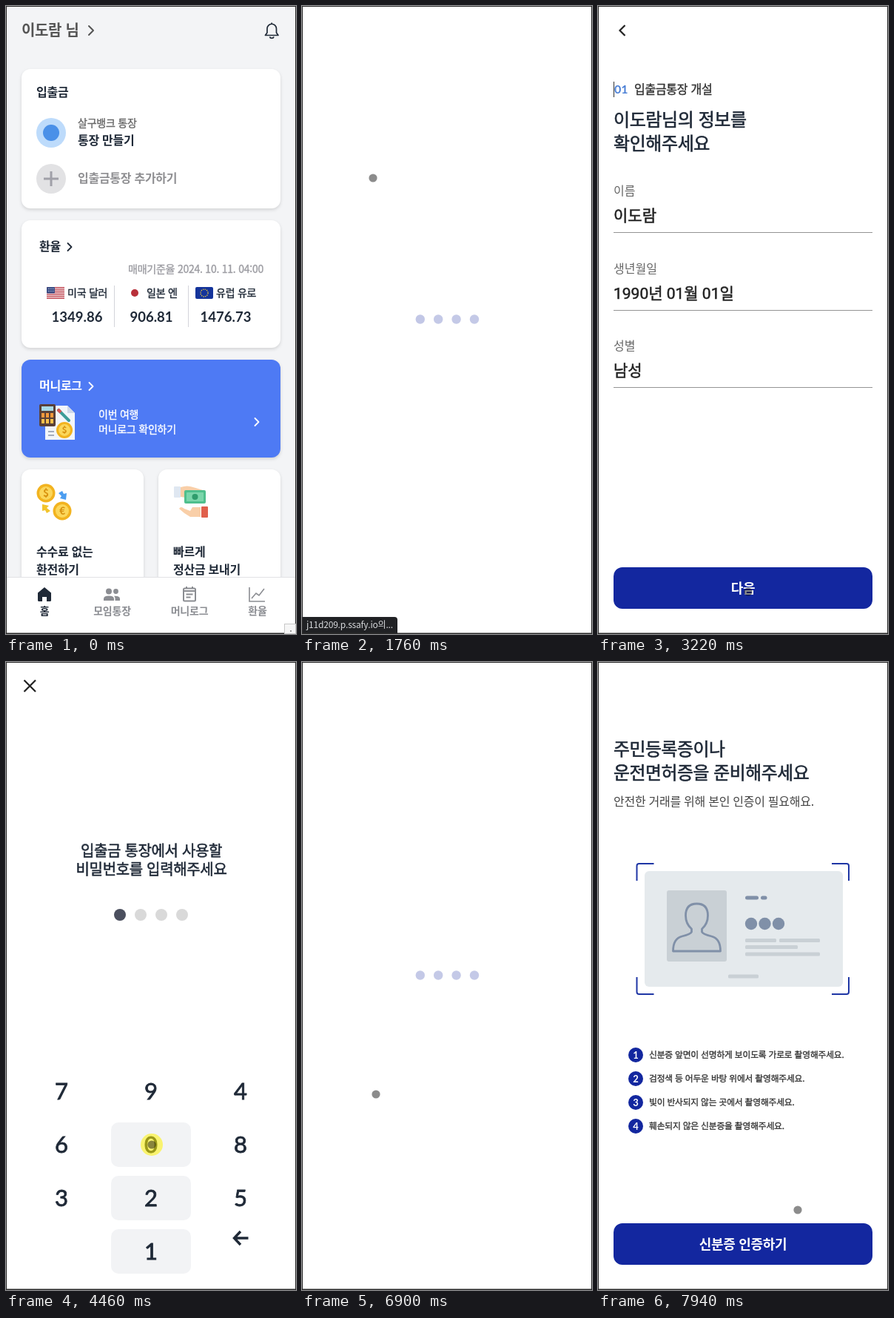
An HTML page for the animation above (8000 ms loop, 392x847 px).

```html
<!DOCTYPE html>
<html lang="ko">
<head>
<meta charset="utf-8">
<style>
html, body { margin: 0; width: 100%; height: 100%; overflow: hidden; background: #fff; }
svg { display: block; width: 100vw; height: 100vh; }
text { font-family: "Noto Sans CJK KR", "Noto Sans", sans-serif; letter-spacing: -.017em; }
.num { font-family: Lato, "Noto Sans CJK KR", sans-serif; letter-spacing: 0; }
.field { font-family: Roboto, "Noto Sans CJK KR", sans-serif; letter-spacing: 0; }
.card { filter: drop-shadow(0 2px 2px #0002); }
</style>
</head>
<body>
<svg id="stage" viewBox="0 0 392 847"></svg>
<script>
const LOOP = 8000, INK = '#1f2937', NAVY = '#13279f', GREY = '#8b8d92';

// --- drawing helpers -------------------------------------------------
const rect = (x, y, w, h, fill, rx = 0, extra = '') =>
  `<rect x="${x}" y="${y}" width="${w}" height="${h}" rx="${rx}" fill="${fill}" ${extra}/>`;
const circle = (x, y, r, fill, extra = '') =>
  `<circle cx="${x}" cy="${y}" r="${r}" fill="${fill}" ${extra}/>`;
const line = (d, stroke, width, extra = '') =>
  `<path d="${d}" fill="none" stroke="${stroke}" stroke-width="${width}" ${extra}/>`;
const shape = (d, fill) => `<path d="${d}" fill="${fill}"/>`;

// y is the vertical middle of the glyphs; weight 500 is regular thickened by a thin stroke
function text(x, y, size, str, fill = INK, weight = 700, anchor = 'start', kind = '') {
  const medium = weight === 500 ? `stroke="${fill}" stroke-width="${size * .026}"` : '';
  return `<text x="${x}" y="${y + size * .37}" font-size="${size}" font-weight="${medium ? 400 : weight}"
    fill="${fill}" text-anchor="${anchor}" class="${kind}" ${medium}>${str}</text>`;
}
const chevron = (x, y, color, s = 5, width = 1.8) =>
  line(`M${x - s / 2} ${y - s}l${s} ${s}l${-s} ${s}`, color, width, 'stroke-linecap="round" stroke-linejoin="round"');
const card = (x, y, w, h, fill = '#fff') => rect(x, y, w, h, fill, 12, 'class="card"');
const coin = (x, y, r, sign) => circle(x, y, r, '#f2b31f') + circle(x, y, r * .72, '#fbd75b') +
  text(x, y, r * 1.1, sign, '#d8920f', 700, 'middle');
const button = label => rect(21, 757, 350, 56, NAVY, 12) + text(196, 785, 18, label, '#fff', 700, 'middle');

// --- home ------------------------------------------------------------
function flags() {
  let stripes = '';
  for (let i = 0; i < 7; i++) stripes += rect(55, 379 + i * 2.46, 24, 1.24, '#c0404c');
  return rect(55, 379, 24, 16, '#f3e9ea', 2) + stripes + rect(55, 379, 11, 8.5, '#3c4f86', 1) +
    line('M57 381.5h8M57 384.5h8', '#c9d0e6', 1, 'stroke-dasharray="1 1.2"') +
    circle(174, 387, 5, '#b8303a') +
    rect(256, 379, 24, 16, '#14349b', 2) +
    circle(268, 387, 5, 'none', 'stroke="#f2cf3b" stroke-width="1.3" stroke-dasharray="1.3 1.32"');
}

function homeIcons() {
  const ledger = shape('M53 539h30l10 10v36h-40z', '#f2f5fa') + shape('M83 539v10h10z', '#cfd8e8') +
    rect(45, 537, 22, 30, '#5a4038', 2) + rect(48, 540, 16, 6, '#a9dbe6') +
    [0, 1, 2].map(i => rect(48 + i * 6, 549, 4, 6, '#f59a3c') + rect(48 + i * 6, 557, 4, 6, '#f8c04c')).join('') +
    line('M71 545l14 14', '#3d9c98', 4, 'stroke-linecap="round"') + line('M70 544l4 4', '#d95353', 4) +
    line('M57 574h8M57 579h8', '#8a94a8', 1.6) + coin(79, 572, 11, '$');
  const exchange = coin(54, 657, 12.5, '$') + coin(76, 681, 12.5, '€') +
    shape('M71 657l5-3 2 4 4-1-1 9-8-2 2-3z', '#4c9df0') + shape('M60 681l-5 3-2-4-4 1 0-9 9 2-3 3z', '#f2c32b');
  const hands = rect(227, 648, 9, 15, '#dfe7f1', 1) + shape('M236 649q9-3 17 0l13 4v5h-20l-3 5-7-1z', '#f9cfa8') +
    rect(241, 653, 29, 18, '#4fbf8d', 2) + rect(244, 656, 23, 12, '#7bd6ab', 1) + circle(255.5, 662, 4, '#2f9c6c') +
    shape('M263 676v13h-14q-9-5-15-11q2-4 7 0l8 3 3-5z', '#f9cfa8') + rect(264, 675, 9, 15, '#e0604c', 1);
  return ledger + exchange + hands;
}

function nav() {
  const label = (x, str, color) => text(x, 816, 14, str, color, 700, 'middle');
  const list = rect(240, 785.5, 16, 17, 'none', 1.5, `stroke="${GREY}" stroke-width="2"`) +
    line('M240 789h16M243.5 793.5h9M243.5 797.5h6M244 783v3M252 783v3', GREY, 2);
  const people = circle(139, 789.5, 4, GREY) + circle(148.5, 789.5, 3.4, GREY) +
    shape('M132 802v-2.5q0-4 7-4t7 4v2.5z', GREY) + shape('M147.5 802v-3q0-2-1.5-3.2q8-.5 8 3.7v2.5z', GREY);
  return rect(0, 770, 392, 77, '#fff') + rect(0, 770, 392, 1, '#e1e2e5') +
    shape('M52 784l9 7.5v10q0 1.5-1.5 1.5h-4.5v-6h-6v6h-4.5q-1.5 0-1.5-1.5v-10z', INK) +
    people + list + line('M329 784v19h21M332 799l6-7 4 3 7-9', GREY, 1.6) +
    label(52, '홈', INK) + label(143.5, '모임통장', GREY) + label(248, '머니로그', GREY) + label(340, '환율', GREY);
}

function home() {
  const rate = (x, str) => text(x, 419, 18.5, str, INK, 700, 'middle', 'num');
  return rect(0, 0, 392, 847, '#f3f4f6') +
    text(21, 33, 20, '이도람 님', '#555') + chevron(115, 33, '#555', 6, 2) +
    line('M350.5 39.5h17.5l-2.5-3.5v-5.5a6.2 6.2 0 0 0-12.5 0v5.5zM356.5 41.5a2.8 2.3 0 0 0 5.5 0M359.2 22.5v2', INK, 1.7, 'stroke-linejoin="round"') +
    card(21, 85, 350, 188) + text(41, 116, 16, '입출금') +
    circle(61, 171, 20, '#bddbfb') + circle(61, 171, 11, '#4a90e8') +
    text(97, 158, 14, '살구뱅크 통장', '#666', 500) + text(97, 181, 16, '통장 만들기') +
    circle(61, 233, 20, '#e2e2e4') + line('M51 233h20M61 223v20', '#a0a0a8', 3) +
    text(97, 232, 16, '입출금통장 추가하기', '#8f8f92') +
    card(21, 289, 350, 172) + text(45, 324, 16, '환율') + chevron(86, 325, INK) +
    text(348, 355, 14, '매매기준율 2024. 10. 11. 04:00', '#9c9ca2', 500, 'end') + flags() +
    text(83, 387, 14, '미국 달러', INK, 500) + text(190, 387, 14, '일본 엔', INK, 500) + text(284, 387, 14, '유럽 유로', INK, 500) +
    rate(96, '1349.86') + rate(196.5, '906.81') + rate(297, '1476.73') +
    rect(146, 377, 1, 56, '#d3d4da') + rect(246, 377, 1, 56, '#d3d4da') +
    card(21, 477, 350, 132, '#4e7af4') + text(45, 512, 16, '머니로그', '#fff') + chevron(115, 513, '#fff') +
    text(125, 551, 14, '이번 여행', '#fff', 500) + text(125, 571, 14, '머니로그 확인하기', '#fff', 500) + chevron(339, 561, '#fff') +
    card(21, 625, 165, 190) + card(206, 625, 165, 190) + homeIcons() +
    text(41, 736, 16, '수수료 없는') + text(41, 760, 16, '환전하기') +
    text(226, 736, 16, '빠르게') + text(226, 760, 16, '정산금 보내기') + nav();
}

// --- other screens ---------------------------------------------------
const loader = () => [0, 1, 2, 3].map(i => circle(159.8 + i * 24.4, 422.5, 6.2, NAVY, 'class="pulse"')).join('');

function form() {
  const row = (y, label, value) => text(21, y, 16, label, '#666', 400, 'start', 'field') +
    text(21, y + 33, 21, value, '#222', 500, 'start', 'field') + rect(21, y + 56, 350, 1, '#949494');
  return line('M36.5 26l-7 7 7 7', '#222', 2.2) +
    text(22, 112, 16, '01', '#4a7fd5', 700, 'start', 'num') + text(49, 112, 16, '입출금통장 개설', '#333', 500) +
    `<g id="caret">${rect(21, 102, 1, 21, '#333')}</g>` +
    text(21, 153, 24, '이도람님의 정보를', INK, 500) + text(21, 185, 24, '확인해주세요', INK, 500) +
    row(249, '이름', '이도람') + row(354, '생년월일', '1990년 01월 01일') + row(458, '성별', '남성') + button('다음');
}

const keyX = i => 75 + (i < 9 ? i % 3 : 1) * 121;
const keyY = i => 579 + Math.floor(i / 3) * 72;

function keypad(lines, digits) {
  const keys = [...digits].map((d, i) =>
    rect(keyX(i) - 54, keyY(i) - 30, 108, 60, '#f2f3f5', 10, 'class="key"') +
    text(keyX(i), keyY(i), 31, d, INK, 500, 'middle', 'num')).join('');
  return line('M24.5 24.5l15.5 15.5M40 24.5l-15.5 15.5', '#222', 2.2) +
    lines.map((s, i) => text(196.5, 255 + i * 25, 20, s, INK, 500, 'middle')).join('') +
    [0, 1, 2, 3].map(i => circle(154 + i * 28, 341, 8, '#d9d9d9', 'class="pin"')).join('') + keys +
    line('M317 768l-8.5 9 8.5 9M309 777h18.5', INK, 3.4);
}

function identity() {
  const slate = '#8090a8', pale = '#c9d0d5';
  const tips = ['신분증 앞면이 선명하게 보이도록 가로로 촬영해주세요.', '검정색 등 어두운 바탕 위에서 촬영해주세요.',
    '빛이 반사되지 않는 곳에서 촬영해주세요.', '훼손되지 않은 신분증을 촬영해주세요.'];
  const tip = (str, i) => circle(51, 530 + i * 32, 10, NAVY) +
    text(51, 530 + i * 32, 13, i + 1, '#fff', 700, 'middle', 'num') + text(69, 530 + i * 32, 11.8, str, '#333', 500);
  return text(21, 117, 23.8, '주민등록증이나', INK, 500) + text(21, 149, 23.8, '운전면허증을 준비해주세요', INK, 500) +
    text(21, 188, 16, '안전한 거래를 위해 본인 인증이 필요해요.', '#444', 400) +
    line('M52.5 295v-20q0-3 3-3h20M316 272h20q3 0 3 3v20M339 425v20q0 3-3 3h-20M75.5 448h-20q-3 0-3-3v-20', '#1f36a5', 2) +
    rect(63, 282, 268, 156, '#e5eaed', 6) + rect(93, 308, 81, 96, pale, 3) +
    line('M101.5 390q0-17 12-20q12-3 13-6v-4q-8-7-8-18q0-16 15-16t15 16q0 11-8 18v4q1 3 13 6q12 3 12 20z', slate, 2.8, 'stroke-linejoin="round"') +
    rect(199, 315.5, 18, 5, slate, 2.5) + rect(220, 315.5, 8.5, 5, slate, 2.5) +
    [207, 225.5, 244].map(x => circle(x, 353, 8.2, slate)).join('') +
    [[199, 373, 42], [245, 373, 55], [199, 382, 71], [199, 391.5, 101], [176, 421.5, 41]]
      .map(([x, y, w]) => rect(x, y, w, 5, pale, 1.5)).join('') +
    tips.map(tip).join('') + button('신분증 인증하기');
}

const screens = {
  home: home(), loader: loader(), form: form(),
  pin: keypad(['입출금 통장에서 사용할', '비밀번호를 입력해주세요'], '7946083251'),
  again: keypad(['비밀번호를', '한 번 더 입력해주세요'], '0458169732'),
  identity: identity()
};

const stage = document.getElementById('stage');
stage.innerHTML = rect(0, 0, 392, 847, '#fff') +
  Object.entries(screens).map(([id, body]) => `<g id="${id}">${body}</g>`).join('') +
  `<g id="status">${shape('M0 824h125q4 0 4 4v18h-129z', '#202124')}${text(6, 834.5, 12, 'j11d209.p.ssafy.io의...', '#d8dadd', 400)}</g>` +
  `<g id="pointer">${circle(0, 0, 15, '#fff200', 'id="halo" opacity=".55"')}${circle(0, 0, 5.6, '#000', 'opacity=".45"')}</g>` +
  line('M0 .5h392M.5 0v847M391.5 0v847', '#2b2b2b', 1) + rect(0, 845.5, 392, 1.5, '#2b2b2b') +
  `<g id="grip">${rect(376.5, 833.5, 15, 13, '#f6f6f6', 0, 'stroke="#c8c8c8"')}${rect(384, 842, 2, 2, '#999')}</g>`;

// --- timeline --------------------------------------------------------
const scenes = [[0, 'home'], [1730, 'loader'], [2150, 'form'], [3400, 'loader'], [3720, 'pin'],
  [5130, 'again'], [6890, 'loader'], [7330, 'identity']];
const path = [[410, 400, 375], [480, 372, 364], [620, 305, 288], [770, 230, 226], [900, 180, 209], [1160, 128, 232],
  [1560, 128, 232], [1760, 96, 232], [2320, 96, 238], [2600, 160, 480], [2850, 230, 725], [3020, 203, 790], [3430, 203, 790],
  [3910, 237, 727], [4110, 197, 651], [5330, 197, 651], [5470, 222, 400], [5540, 226, 248], [5610, 180, 420],
  [5680, 121, 597], [5820, 100, 583], [7330, 100, 583], [7660, 127, 257], [7730, 205, 300], [7800, 290, 470],
  [7870, 296, 640], [7940, 270, 739], [8000, 270, 739]];
// press time and the keys that light up with it
const presses = [[1490, []], [3290, []], [4180, [4, 6]], [4460, [4, 7, 9]], [4730, [3, 4, 9]], [5000, [0, 4, 8]],
  [6020, [0, 4, 9]], [6160, [0, 3, 7]], [6300, [0, 1, 9]], [6630, []]];

const byId = id => document.getElementById(id);
const show = (el, on) => el.style.display = on ? '' : 'none';

function pointerAt(t) {
  const i = path.findIndex(p => p[0] > t);
  if (i < 1) return [-50, -50];
  const [t0, x0, y0] = path[i - 1], [t1, x1, y1] = path[i], k = (t - t0) / (t1 - t0);
  return [x0 + (x1 - x0) * k, y0 + (y1 - y0) * k];
}

function draw(now) {
  const t = now % LOOP;
  const [start, current] = scenes.filter(s => s[0] <= t).pop();
  for (const id in screens) show(byId(id), id === current);

  const press = presses.find(([p]) => t >= p - 10 && t < p + 60);
  show(byId('halo'), press);
  byId('pointer').setAttribute('transform', `translate(${pointerAt(t)})`);
  show(byId('caret'), t >= 2310);
  show(byId('status'), t >= 1560 && t < 2150);
  byId('grip').style.opacity = Math.max(0, 1 - t / 210);

  if (current === 'loader') {
    document.querySelectorAll('.pulse').forEach((dot, i) => {
      const phase = Math.max(0, (t - start) / 800 - i * .15);
      dot.style.opacity = .25 + .5 * Math.sin(Math.PI * phase) ** 2;
    });
  }
  if (current === 'pin' || current === 'again') {
    const filled = presses.filter(([p, keys]) => keys.length && p >= start && t >= p + 60).length;
    byId(current).querySelectorAll('.pin').forEach((dot, i) => dot.setAttribute('fill', i < filled ? '#4b4f5e' : '#d9d9d9'));
    byId(current).querySelectorAll('.key').forEach((key, i) => show(key, press && press[1].includes(i)));
  }
}

function tick() {
  draw(performance.now());
  requestAnimationFrame(tick);
}
tick();
</script>
</body>
</html>
```
